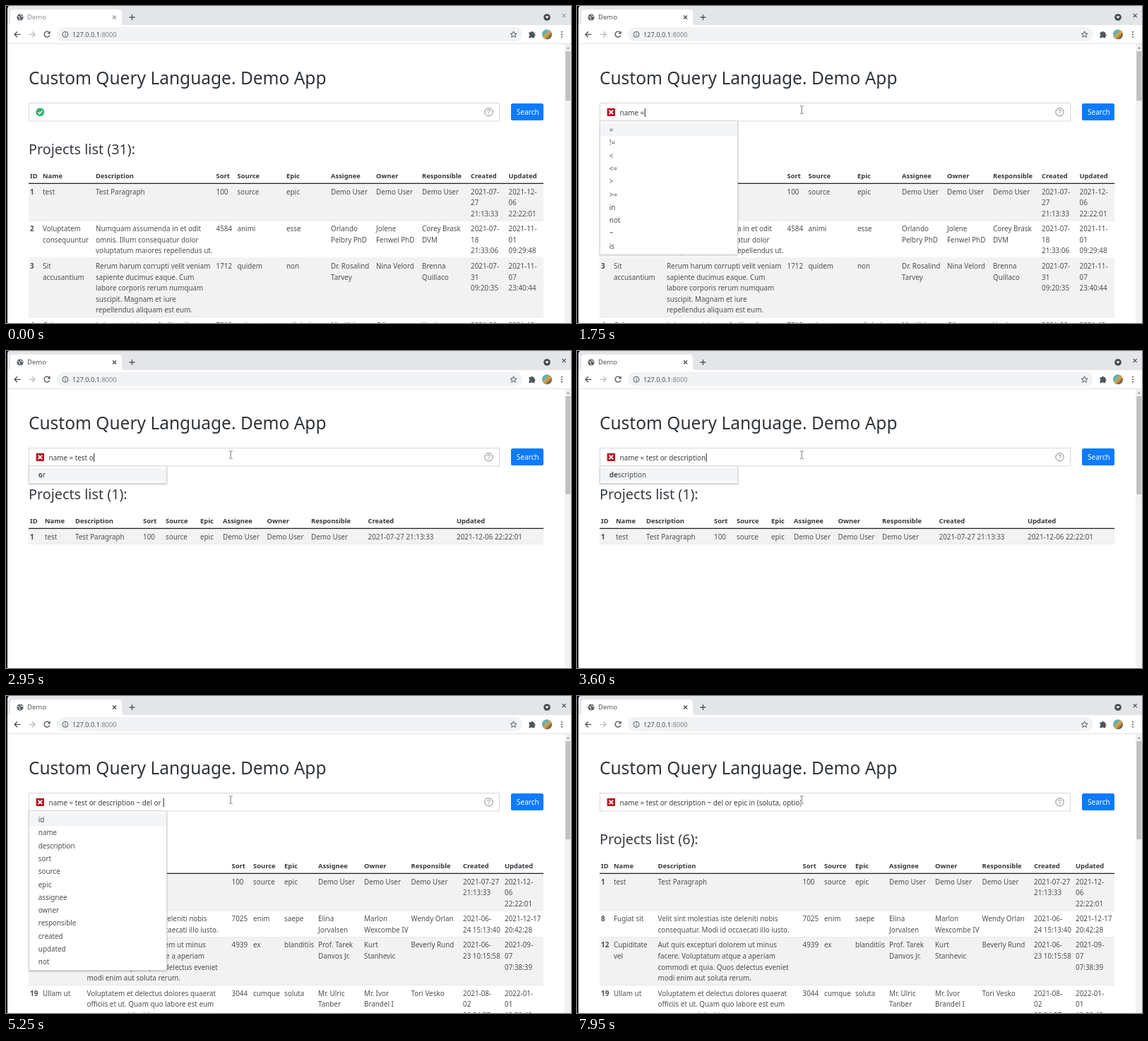
Write an HTML page that moves like this. It is 800 by 449 pixels and loops after 8 s.

```html
<!DOCTYPE html>
<html lang="en">
<head>
<meta charset="utf-8">
<title>Demo</title>
<style>
  html, body { margin: 0; width: 100%; height: 100%; overflow: hidden; background: #fff; }
  svg { display: block; width: 100vw; height: 100vh; }
  text { font-family: "Noto Sans", sans-serif; font-size: 9.85px; fill: #4b4f53; white-space: pre; }
  .h1 { font-size: 24.5px; fill: #30353a; }
  .h2 { font-size: 19.8px; fill: #363b40; }
  .th { font-size: 9.4px; font-weight: 700; fill: #33383d; }
  .bold { font-weight: 700; }
  .line { fill: none; stroke: #50555a; stroke-width: 1.3; }
  .chrome { fill: #8b8f94; }
  .chrome-line { fill: none; stroke: #9a9ea3; stroke-width: 1.2; }
  .active .chrome { fill: #50545a; }
  .active .chrome-line { stroke: #45494d; }
  #query { fill: #3a3e42; }
</style>
</head>
<body>
<svg id="stage" viewBox="0 0 800 449" preserveAspectRatio="none">
  <defs>
    <linearGradient id="photo" x1="0" y1="0" x2="1" y2="1">
      <stop offset=".2" stop-color="#45b5c4"/>
      <stop offset=".55" stop-color="#d9a24b"/>
      <stop offset=".9" stop-color="#3b3a33"/>
    </linearGradient>
    <filter id="shadow" x="-5%" y="-20%" width="110%" height="150%">
      <feDropShadow dx="0" dy="1" stdDeviation="1.2" flood-opacity=".28"/>
    </filter>
  </defs>
  <rect width="800" height="449" fill="#fff"/>

  <!-- browser window -->
  <rect width="800" height="28" fill="#e3e5e9"/>
  <path d="M3 27q3 0 3-4V10q0-5 5-5H159q5 0 5 5V23q0 4 3 4z" fill="#fff"/>
  <rect y="27" width="800" height="26" fill="#fff"/>
  <rect y="53" width="800" height="1" fill="#e0e2e5"/>
  <circle cx="20" cy="16" r="4.6" fill="#5b6065"/>
  <path d="M16.5 14.5l3 1.2-.5 2 1.5 2M20.5 12.5l.5 1.7 3 .8" stroke="#fff" fill="none"/>
  <text x="30" y="19.3" class="chrome" style="font-size:9.5px">Demo</text>
  <path class="chrome-line" d="M151 13.5l5 5m0-5l-5 5"/>
  <path class="line" d="M174.5 16h8m-4-4v8"/>
  <circle cx="766" cy="16" r="4.8" fill="#45494d"/>
  <path d="M763.3 14.6h5.4L766 18z" fill="#fff"/>
  <path class="chrome-line" d="M787.7 11.2l5 5m0-5l-5 5"/>
  <path class="line" d="M20.5 40.3h-8.5m4-4l-4 4 4 4"/>
  <path class="line" style="stroke:#b9bcc0" d="M32.5 40.3h8.5m-4-4l4 4-4 4"/>
  <path class="line" d="M61.5 38a4 4 0 1 0 .3 3.6M62 35.8v3h-3"/>
  <rect x="72" y="30" width="659" height="20" rx="10" fill="#f1f3f4"/>
  <circle class="line" cx="84" cy="40.3" r="4" style="stroke-width:1"/>
  <path class="line" style="stroke-width:1" d="M84 39.8v2.6m0-4.6v1"/>
  <text x="94" y="43.6" style="font-size:9.2px">127.0.0.1<tspan fill="#80848a">:8000</tspan></text>
  <path class="line" style="stroke-width:1" d="M718.6 35.8l1.3 3 3.2.3-2.4 2.1.7 3.1-2.8-1.7-2.8 1.7.7-3.1-2.4-2.1 3.2-.3z"/>
  <path d="M740.5 37.3h2.5a1.5 1.5 0 0 1 3 0h2.3v2.5a1.6 1.6 0 0 1 0 3.1v2.4h-2.6a1.5 1.5 0 0 0-2.8 0h-2.4v-2.6a1.5 1.5 0 0 0 0-2.8z" fill="#50555a"/>
  <circle cx="766" cy="40.3" r="7" fill="url(#photo)"/>
  <g fill="#50555a"><circle cx="787" cy="36.8" r="1"/><circle cx="787" cy="40.3" r="1"/><circle cx="787" cy="43.8" r="1"/></g>
  <rect x="791" y="54" width="9" height="395" fill="#f1f1f1"/>
  <path d="M793.5 60.5l2.3-2.6 2.3 2.6z" fill="#8a8a8a"/>
  <rect id="thumb" x="792.3" y="64" width="7" height="70" fill="#c1c1c1"/>
  <path d="M0 0H4Q2 1 2 4V449H0z" fill="#000"/>

  <!-- page -->
  <text class="h1" x="32" y="110.5">Custom Query Language. Demo App</text>
  <rect x="32.5" y="137.5" width="666" height="25.5" fill="#fff" stroke="#d6d8da"/>
  <g id="valid">
    <circle cx="48.3" cy="150.3" r="6" fill="#3bb27a"/>
    <path d="M45.4 150.4l2.2 2.2 3.8-4" fill="none" stroke="#fff" stroke-width="1.4"/>
  </g>
  <g id="invalid">
    <rect x="42.6" y="144.8" width="11.4" height="11.2" rx=".8" fill="#b3191f"/>
    <path d="M45.5 147.6l5.6 5.6m0-5.6l-5.6 5.6" stroke="#fff" stroke-width="1.8"/>
  </g>
  <text id="query" x="60.6" y="154.6"/>
  <rect id="caret" y="145" width="1" height="12" fill="#222"/>
  <circle cx="683.5" cy="150.2" r="5.7" fill="none" stroke="#80858a"/>
  <path d="M681.8 148.9q0-1.9 1.8-1.9t1.8 1.6q0 1-1 1.5t-.8 1.4m0 1.1v1" fill="none" stroke="#80858a"/>
  <rect x="715" y="138" width="46" height="24" rx="2.6" fill="#0d7bff"/>
  <text x="723" y="153.7" style="fill:#fff;font-size:10px">Search</text>
  <text id="count" class="h2" x="32" y="210"/>
  <g id="tables"/>
  <g id="menu"/>
  <g id="mouse" fill="none">
    <path d="M315.8 141.5q2 0 2.4 1.2.4-1.2 2.4-1.2M318.2 142.5v9M315.8 152.6q2 0 2.4-1.2.4 1.2 2.4 1.2" stroke="#fff" stroke-width="2.4"/>
    <path d="M315.8 141.5q2 0 2.4 1.2.4-1.2 2.4-1.2M318.2 142.5v9M315.8 152.6q2 0 2.4-1.2.4 1.2 2.4 1.2" stroke="#777"/>
  </g>
</svg>
<script>
const $ = id => document.getElementById(id);
const LOOP = 8000, LINE = 15.6, ITEM = 18.3;

function add(parent, tag, attrs, text) {
  const el = document.createElementNS('http://www.w3.org/2000/svg', tag);
  for (const k in attrs) el.setAttribute(k, attrs[k]);
  if (text !== undefined) el.textContent = text;
  return parent.appendChild(el);
}
const show = (el, on) => { el.style.display = on ? '' : 'none'; };

// Cells are split by "|", lines inside a cell by "/".
const HEAD = 'ID|Name|Description|Sort|Source|Epic|Assignee|Owner|Responsible|Created|Updated';
const testRow = (created, updated) =>
  `1|test|Test Paragraph|100|source|epic|Demo User|Demo User|Demo User|${created}|${updated}`;

function makeTable(xs, rows) {
  const g = add($('tables'), 'g', {});
  HEAD.split('|').forEach((h, i) => add(g, 'text', { x: xs[i], y: 244.2, class: 'th' }, h));
  let y = 252;
  rows.forEach((row, r) => {
    const cells = row.split('|').map(c => c.split('/'));
    const height = Math.max(...cells.map(c => c.length)) * LINE + 5.85;
    add(g, 'rect', { x: 32, y, width: 729, height, fill: r % 2 ? '#fff' : '#f2f2f2' });
    add(g, 'rect', { x: 32, y: y + height - .7, width: 729, height: .7, fill: '#dee2e6' });
    cells.forEach((lines, c) => lines.forEach((s, i) =>
      add(g, 'text', { x: xs[c], y: y + 14.6 + i * LINE, class: c ? '' : 'bold' }, s)));
    y += height;
  });
  add(g, 'rect', { x: 32, y: 250.7, width: 729, height: 1.3, fill: '#212529' });
  return g;
}

const tables = [
  makeTable([34, 52, 127, 297.5, 327.5, 397, 460, 524, 589, 658, 711.5], [
    testRow('2021-07-/27/21:13:33', '2021-12-/06/22:22:01'),
    '2|Voluptatem/consequuntur|Numquam assumenda in et odit/omnis. Illum consequatur dolor/voluptatum maiores repellendus ut.|4584|animi|esse|Orlando/Pelbry PhD|Jolene/Fenwel PhD|Corey Brask/DVM|2021-07-/18/21:33:06|2021-11-/01/09:29:48',
    '3|Sit/accusantium|Rerum harum corrupti velit veniam/sapiente ducimus eaque. Cum/labore corporis rerum numquam/suscipit. Magnam et iure/repellendus aliquam est eum.|1712|quidem|non|Dr. Rosalind/Tarvey|Nina Velord|Brenna/Quillaco|2021-07-/31/09:20:35|2021-11-/07/23:40:44',
    '4|Culpa|Labore et dolorem facilis odit|7319|voluptas|adipisci|Ms. Kirla|Olbara|Verda|2021-08-|2021-12-'
  ]),
  makeTable([34, 55, 98, 194, 226, 275, 307, 369.5, 432, 512.5, 638], [
    testRow('2021-07-27 21:13:33', '2021-12-06 22:22:01')
  ]),
  makeTable([34, 52, 114.5, 319.5, 350, 394, 442, 507, 573.5, 647, 706], [
    testRow('2021-07-27/21:13:33', '2021-12-/06/22:22:01'),
    '8|Fugiat sit|Velit sint molestias iste deleniti nobis/consequatur. Modi id occaecati illo iusto.|7025|enim|saepe|Elina/Jorvalsen|Marlon/Wexcombe IV|Wendy Orlan|2021-06-/24 15:13:40|2021-12-17/20:42:28',
    '12|Cupiditate/vel|Aut quis excepturi dolorem ut minus/facere. Voluptatum atque a aperiam/commodi et quia. Quos delectus eveniet/modi enim aut soluta rerum.|4939|ex|blanditiis|Prof. Tarek/Danvos Jr.|Kurt/Stanhevic|Beverly Rund|2021-06-/23 10:15:58|2021-09-/07/07:38:39',
    '19|Ullam ut|Voluptatem et delectus dolores quaerat/officiis et ut. Quam quo labore est eum/accusamus deleniti.|3044|cumque|soluta|Mr. Ulric/Tanber|Mr. Ivor/Brandel I|Tori Vesko|2021-08-/02/09:04:57|2022-01-/01/10:38:43'
  ])
];

const FIELDS = 'id name description sort source epic assignee owner responsible created updated not'.split(' ');
const OPS = '= != < <= > >= in not ~ is'.split(' ');
const LOGIC = ['and', 'or'];
const NONE = [];

// [time, typed text, menu items, length of the bold prefix]
const steps = [
  [0, '', NONE],
  [450, 'n', ['name'], 1], [550, 'a', ['name'], 2], [650, 'm', ['name'], 3],
  [750, 'e', ['name'], 4], [900, '', NONE],
  [1150, ' ', OPS], [1650, '=', OPS], [1800, '', NONE], [1850, ' ', NONE],
  [2000, 't', NONE], [2050, 'e', NONE], [2100, 's', NONE], [2150, 't', NONE],
  [2800, ' ', LOGIC], [2900, 'o', ['or'], 1], [3000, 'r', ['or'], 2], [3100, '', NONE],
  [3150, ' ', FIELDS], [3350, 'd', ['description'], 1], [3450, 'e', ['description'], 2],
  [3550, 'scription', ['description'], 2], [3650, '', NONE],
  [3700, ' ', OPS], [3850, '~', ['~']], [3950, '', NONE], [4050, ' ', NONE],
  [4200, 'd', NONE], [4300, 'e', NONE], [4400, 'l', NONE],
  [4900, ' ', LOGIC], [5000, 'o', ['or'], 1], [5100, 'r', ['or'], 2], [5150, '', NONE],
  [5200, ' ', FIELDS], [5450, 'e', ['epic'], 1], [5600, 'p', ['epic'], 2],
  [5700, 'ic', ['epic'], 2], [5750, '', NONE],
  [5900, ' ', OPS], [6000, 'i', ['in', 'is'], 1], [6050, 'n', ['in'], 2], [6100, '', NONE],
  [6200, ' ', NONE], [6700, '(', NONE]
];
const type = (text, start, gap) =>
  [...text].forEach((ch, i) => steps.push([start + i * gap, ch, NONE]));
type('soluta', 6800, 50);
type(', ', 7300, 100);
type('opt', 7600, 50);
type('io', 7800, 50);
type(')', 7950, 0);

const caretOff = [[0, 300], [1000, 1100], [2300, 2800], [4500, 4900], [6350, 6550], [7950, 8000]];
const within = (t, [from, to]) => t >= from && t < to;

const pen = document.createElement('canvas').getContext('2d');
pen.font = '9.85px "Noto Sans", sans-serif';

function drawMenu(items, bold = 0) {
  const menu = $('menu');
  menu.replaceChildren();
  if (!items.length) return;
  add(menu, 'rect', { x: 32.5, y: 163, width: 195, height: items.length * ITEM + 6,
    fill: '#fff', stroke: '#cfd1d3', 'stroke-width': .8, filter: 'url(#shadow)' });
  add(menu, 'rect', { x: 33, y: 166, width: 194, height: ITEM, fill: '#f3f4f6' });
  items.forEach((item, i) => {
    const label = add(menu, 'text', { x: 45.8, y: 179 + i * ITEM });
    add(label, 'tspan', { class: 'bold' }, item.slice(0, bold));
    add(label, 'tspan', {}, item.slice(bold));
  });
}

function tween(t, start, from, to) {
  const p = Math.min(1, Math.max(0, (t - start) / 225));
  return Math.round(from + (to - from) * (1 - (1 - p) ** 2));
}

let lastStep = -1;
function draw(t) {
  const n = steps.findLastIndex(s => s[0] <= t);
  if (n !== lastStep) {
    lastStep = n;
    const query = steps.slice(0, n + 1).map(s => s[1]).join('');
    const ok = /^$|[=~] \w+ ?$/.test(query);
    $('query').textContent = query;
    $('caret').setAttribute('x', 61.2 + pen.measureText(query).width);
    show($('valid'), ok);
    show($('invalid'), !ok);
    drawMenu(steps[n][2], steps[n][3]);
  }
  const count = t < 4000 ? tween(t, 2300, 31, 1) : tween(t, 4525, 1, 6);
  $('count').textContent = `Projects list (${count}):`;
  show(tables[0], t < 2300);
  show(tables[1], within(t, [2600, 4550]));
  show(tables[2], t >= 4750);
  $('thumb').setAttribute('height', t < 2300 ? 70 : 139);
  show($('caret'), !caretOff.some(span => within(t, span)));
  show($('mouse'), t >= 300);
  $('stage').classList.toggle('active', t >= 300);
}

const begin = performance.now();
function tick() {
  const t = (performance.now() - begin) % LOOP;
  draw(Math.floor(t / 50) * 50);
  requestAnimationFrame(tick);
}
tick();
</script>
</body>
</html>
```
